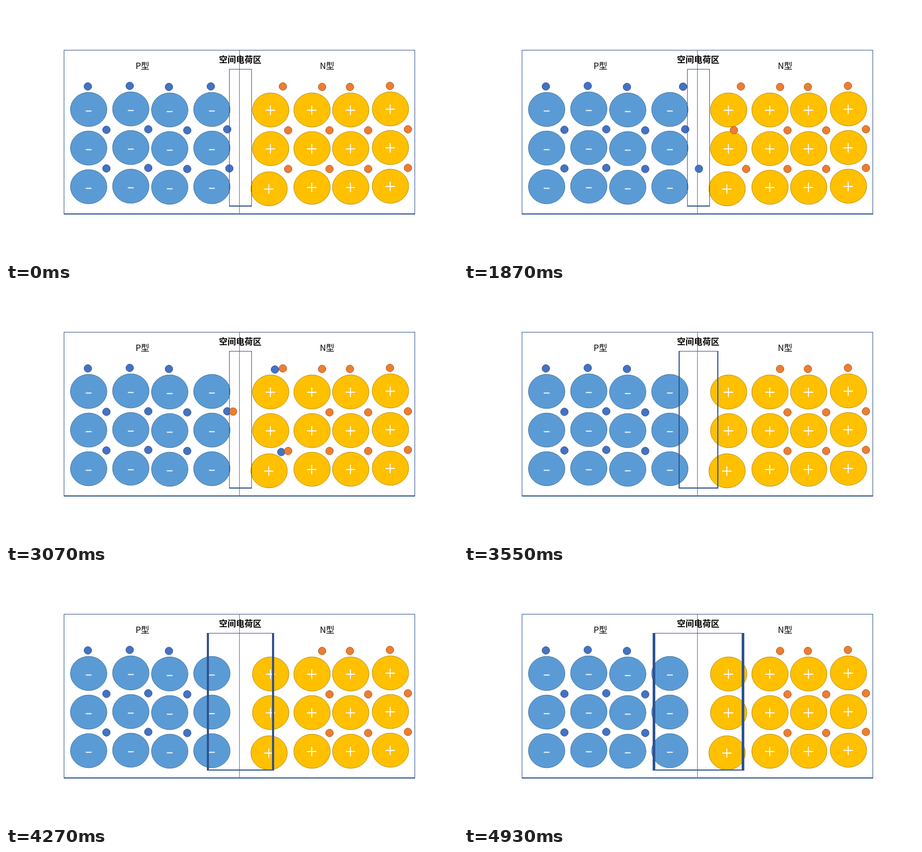
An HTML page that plays this animation: 853 by 480 pixels, repeating every 5.86 s.

```html
<!DOCTYPE html>
<html lang="zh">
<head>
<meta charset="utf-8">
<title>PN</title>
<style>
html, body { margin: 0; width: 100%; height: 100%; overflow: hidden; background: #fff; }
svg { display: block; }
text { font: 500 16px "Noto Sans CJK SC", "Noto Sans CJK", "Noto Sans", sans-serif; text-anchor: middle; }
.crisp { shape-rendering: crispEdges; fill: #2f528f; }
.p { fill: #5b9bd5; stroke: #41719c; }
.n { fill: #ffc000; stroke: #bc8c00; }
.hole { fill: #4472c4; stroke: #2f528f; }
.electron { fill: #ed7d31; stroke: #ae5a21; }
.sign { stroke: #fff; stroke-width: 1.8; fill: none; }
</style>
</head>
<body>
<svg id="stage" width="853" height="480" viewBox="0 0 853 480"></svg>
<script>
const LOOP = 5860, STEP = 60, START = 1270, DRIFT = 1800, GROW = 3106;
const stage = document.getElementById('stage');

function add(tag, attrs, text) {
  const el = document.createElementNS('http://www.w3.org/2000/svg', tag);
  for (const k in attrs) el.setAttribute(k, attrs[k]);
  if (text) el.textContent = text;
  return stage.appendChild(el);
}

const bar = (x, y, width, height) => add('rect', { x, y, width, height, class: 'crisp' });

function ion(type, x, y) {
  add('ellipse', { cx: x, cy: y, rx: 34.4, ry: 32.3, class: type });
  const d = type === 'p'
    ? `M${x - 5.5} ${y + 3}h11`
    : `M${x - 9.5} ${y + .5}h18M${x - .5} ${y - 8.5}v18`;
  add('path', { d, class: 'sign' });
}

const dot = (type, x, y) => add('circle', { cx: x, cy: y, r: 7.2, class: type });

// Outer frame
bar(109, 83, 663, 1);
bar(109, 392, 663, 2);
bar(109, 83, 1, 311);
bar(771, 83, 1, 311);

add('text', { x: 257.5, y: 119 }, 'P型');
add('text', { x: 606, y: 119 }, 'N型');
add('text', { x: 442, y: 107, style: 'font-weight:700' }, '空间电荷区');

// Fixed ions: column x and top row y
const ROW = 73;
const columns = {
  p: [[156, 195.5], [235.5, 194.5], [309, 196.5], [388.5, 195.5]],
  n: [[499.5, 196.5], [577.5, 196.5], [650.5, 196.5], [725.5, 194.5]]
};
for (const type in columns)
  columns[type].forEach(([x, y], col) => {
    for (let r = 0; r < 3; r++)
      if (type === 'p' || col || r < 2) ion(type, x, y + r * ROW);
  });

// Carriers that stay
const fixed = {
  hole: [[154.5, 152], [233.5, 151], [307.5, 153]],
  electron: [[596.5, 153], [649, 153], [724.5, 151]]
};
const paired = {
  hole: [[189.5, 234], [268.5, 233], [342, 235]],
  electron: [[610.5, 235], [683.5, 235], [758.5, 233]]
};
for (const type in fixed) {
  fixed[type].forEach(([x, y]) => dot(type, x, y));
  paired[type].forEach(([x, y]) => { dot(type, x, y); dot(type, x, y + ROW); });
}

// Carriers that recombine: start, then travel
const movers = [
  ['hole', 386.5, 152, 121, 2],
  ['hole', 421.5, 307, 98, 3],
  ['hole', 417.5, 233, 0, 0],
  ['electron', 522.5, 152, 0, 0],
  ['electron', 532.5, 308, 0, 0],
  ['electron', 532.5, 235, -104, -1.5]
].map(([type, x, y, dx, dy]) => ({ el: dot(type, x, y), dx, dy }));

ion('n', 496.5, 345.5);

add('rect', { x: 440, y: 84, width: 1, height: 309, class: 'crisp', style: 'fill:#4472c4' });

// Depletion region
const top_ = bar(0, 119, 0, 1), bottom = bar(0, 377, 0, 2);
const left = bar(0, 119, 0, 260), right = bar(0, 119, 0, 260);
const setX = (el, x, w) => { el.setAttribute('x', x); el.setAttribute('width', w); };

const clamp = v => Math.min(1, Math.max(0, v));
const ease = x => x < .5 ? 2 * x * x : 1 - 2 * (1 - x) ** 2;

function draw(now) {
  let t = now % LOOP;
  t = t < START ? 0 : START + Math.floor((t - START) / STEP) * STEP;

  const k = ease(clamp((t - START) / DRIFT));
  for (const { el, dx, dy } of movers) {
    el.setAttribute('transform', `translate(${dx * k} ${dy * k})`);
    el.setAttribute('visibility', t < GROW ? 'visible' : 'hidden');
  }

  const scale = 1 + 3 * clamp((t - GROW) / DRIFT);
  const half = 21 * scale, w = Math.round(1.33 * scale);
  const a = Math.round(442.5 - half - w / 2), b = Math.round(442.5 + half - w / 2);
  setX(left, a, w);
  setX(right, b, w);
  setX(top_, a, b + w - a);
  setX(bottom, a, b + w - a);
}

const began = performance.now();
function tick() {
  draw(performance.now() - began);
  requestAnimationFrame(tick);
}
tick();
</script>
</body>
</html>
```
